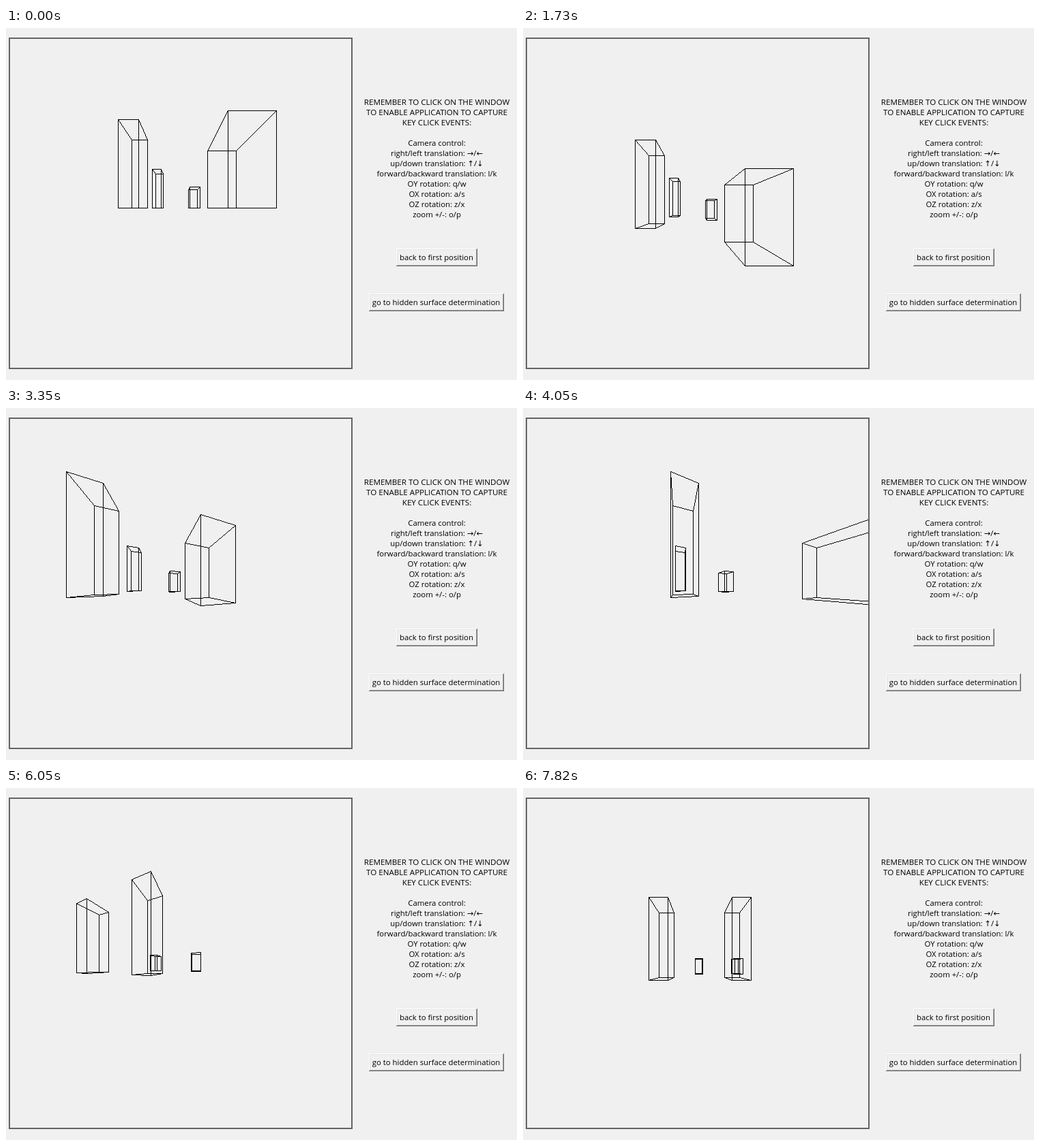
These frames come from a looping animation (749 px wide and 517 px high, 8000 ms). An HTML page with a canvas:

```html
<!DOCTYPE html>
<html lang="en">
<head>
<meta charset="utf-8">
<title>Virtual camera</title>
<style>
  html, body { margin: 0; width: 100%; height: 100%; overflow: hidden; background: #f0f0f0; }
  canvas { display: block; }
</style>
</head>
<body>
<canvas id="stage" width="749" height="517"></canvas>
<script>
const ctx = document.getElementById('stage').getContext('2d');
const LOOP = 8000;
const FOCAL = 100, CX = 254, CY = 264;
const STEP = 10, TURN = Math.PI / 12, PIVOT_Z = -90;
const VIEW = { x: 4, y: 14, w: 504, h: 487, border: 2 };

// Each box: left x, near z, side of the square base, height
const boxes = [
  [-90, 100, 30, 130],
  [-90, 230, 30, 130],
  [25, 35, 25, 50],
  [25, 165, 25, 50],
];

// Key presses over time: r/l/u/d shift the scene, q turns it around OY
const keys = [
  [620, 'd'], [770, 'd'], [1050, 'd'], [1200, 'r'], [1730, 'l'], [1860, 'l'],
  [2010, 'l'], [2410, 'u'], [2680, 'u'], [2830, 'r'], [2950, 'r'], [3070, 'q'],
  [3190, 'r'], [3350, 'r'], [3900, 'rrrr'], [4050, 'rrrrr'], [4170, 'rrrrq'],
  [4450, 'r'], [4850, 'r'], [5000, 'rrrrr'], [5120, 'rrrrq'], [5370, 'r'],
  [5520, 'q'], [5770, 'q'], [6050, 'r'], [6480, 'rr'], [6600, 'rrrr'],
  [6750, 'rrrrrr'], [6870, 'rrq'], [7150, 'r'], [7450, 'r'], [7570, 'r'], [7820, 'd'],
];

const help = [
  'REMEMBER TO CLICK ON THE WINDOW',
  'TO ENABLE APPLICATION TO CAPTURE',
  'KEY CLICK EVENTS:',
  '',
  'Camera control:',
  'right/left translation: →/←',
  'up/down translation: ↑/↓',
  'forward/backward translation: l/k',
  'OY rotation: q/w',
  'OX rotation: a/s',
  'OZ rotation: z/x',
  'zoom +/-: o/p',
];

function poseAt(time) {
  const pose = { x: 0, y: 0, z: 0, angle: 0 };
  const press = {
    r() { pose.x += STEP; },
    l() { pose.x -= STEP; },
    u() { pose.y += STEP; },
    d() { pose.y -= STEP; },
    q() {
      const [x, z] = rotate(pose.x, pose.z - PIVOT_Z, TURN);
      pose.x = x;
      pose.z = z + PIVOT_Z;
      pose.angle += TURN;
    },
  };
  for (const [at, pressed] of keys) {
    if (at > time) break;
    for (const key of pressed) press[key]();
  }
  return pose;
}

function rotate(x, z, angle) {
  const c = Math.cos(angle), s = Math.sin(angle);
  return [x * c - z * s, x * s + z * c];
}

function project(x, y, z, pose) {
  const [rx, rz] = rotate(x, z, pose.angle);
  const scale = FOCAL / (rz + pose.z);
  return [
    Math.floor(CX + (rx + pose.x) * scale + 1e-6),
    Math.floor(CY - (y + pose.y) * scale + 1e-6),
  ];
}

function rect(color, x, y, w, h) {
  ctx.fillStyle = color;
  ctx.fillRect(x, y, w, h);
}

// Hard-edged one pixel line
function line([x0, y0], [x1, y1]) {
  if (x0 === x1 || y0 === y1) {
    ctx.fillRect(Math.min(x0, x1), Math.min(y0, y1), Math.abs(x1 - x0) + 1, Math.abs(y1 - y0) + 1);
    return;
  }
  const n = Math.max(Math.abs(x1 - x0), Math.abs(y1 - y0));
  for (let i = 0; i <= n; i++) {
    ctx.fillRect(Math.round(x0 + (x1 - x0) * i / n), Math.round(y0 + (y1 - y0) * i / n), 1, 1);
  }
}

function drawBox([left, near, side, height], pose) {
  const corners = [];
  for (let i = 0; i < 8; i++) {
    corners.push(project(left + (i & 1 ? side : 0), i & 2 ? height : 0, near + (i & 4 ? side : 0), pose));
  }
  for (let i = 0; i < 8; i++) {
    for (const bit of [1, 2, 4]) {
      if (!(i & bit)) line(corners[i], corners[i | bit]);
    }
  }
}

function text(str, x, y, size = 11.35) {
  ctx.font = `${size}px "Open Sans", "Noto Sans", "DejaVu Sans", sans-serif`;
  ctx.textAlign = 'center';
  ctx.fillStyle = '#000';
  ctx.fillText(str, x, y);
}

function button(label, x, y, w, h) {
  rect('#696969', x, y, w, h);
  rect('#fff', x, y, w - 1, h - 1);
  rect('#a0a0a0', x + 1, y + 1, w - 2, h - 2);
  rect('#e3e3e3', x + 1, y + 1, w - 3, h - 3);
  rect('#f0f0f0', x + 2, y + 2, w - 4, h - 4);
  text(label, x + w / 2 - 0.5, y + 17);
}

function draw(time) {
  const { x, y, w, h, border } = VIEW;
  const inner = [x + border, y + border, w - 2 * border, h - 2 * border];
  rect('#f0f0f0', 0, 0, 749, 517);
  rect('#646464', x, y, w, h);
  rect('#f0f0f0', ...inner);

  ctx.save();
  ctx.beginPath();
  ctx.rect(...inner);
  ctx.clip();
  ctx.fillStyle = '#000';
  const pose = poseAt(time);
  for (const box of boxes) drawBox(box, pose);
  ctx.restore();

  help.forEach((str, i) => text(str, 631.5, 113 + 15 * i, i < 3 ? 11.6 : 11.35));
  button('back to first position', 572, 324, 119, 26);
  button('go to hidden surface determination', 532, 390, 198, 26);
}

const start = performance.now();
function tick() {
  draw((performance.now() - start) % LOOP);
  requestAnimationFrame(tick);
}
tick();
</script>
</body>
</html>
```
